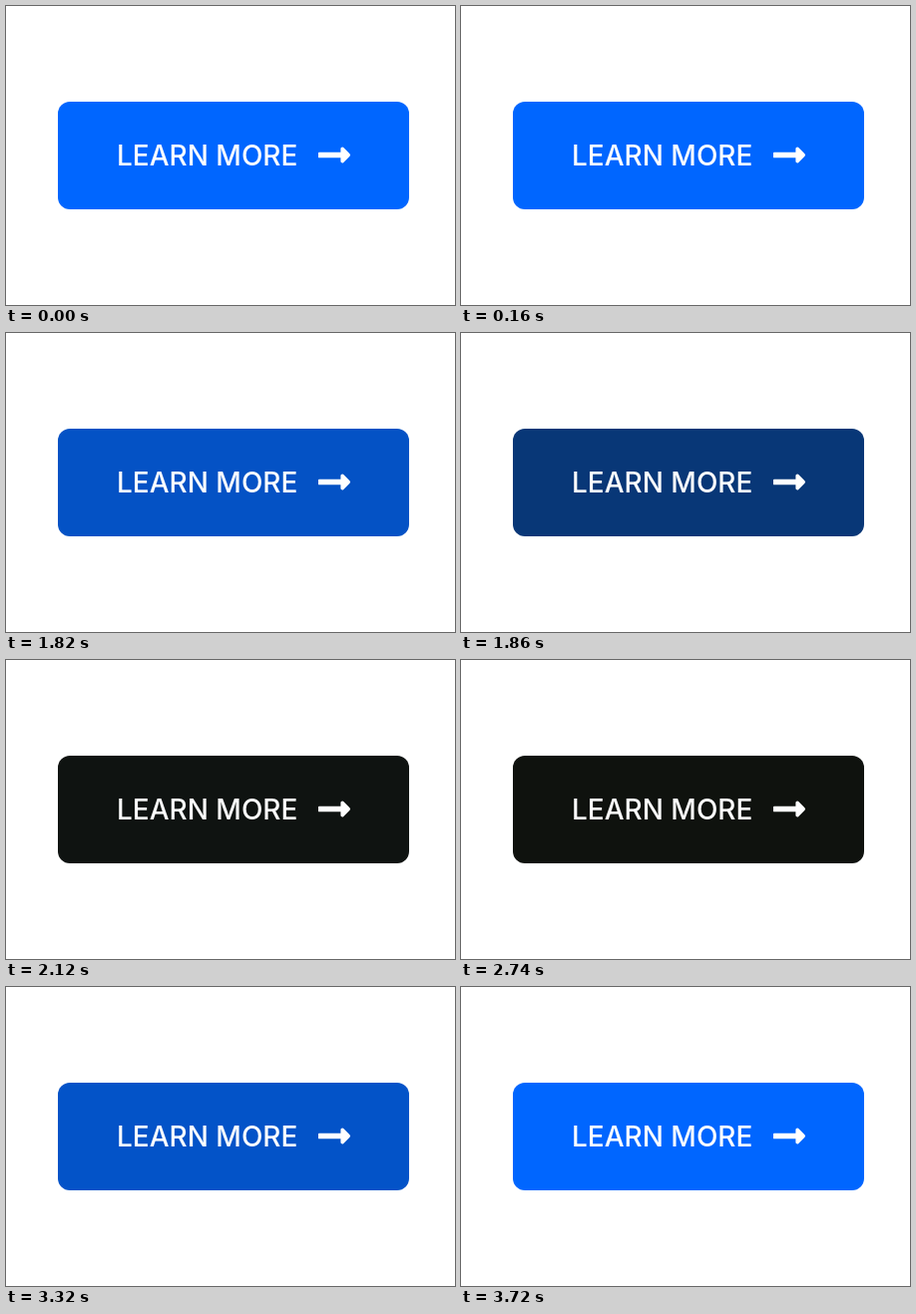
These frames come from a looping animation (450 px wide and 300 px high, 4.44 s). An HTML page with a canvas:

```html
<!DOCTYPE html>
<html lang="en">
<head>
<meta charset="utf-8">
<title>Learn more button</title>
<style>
  html, body { margin: 0; width: 100%; height: 100%; overflow: hidden; background: #fff; }
  canvas { display: block; width: 450px; height: 300px; }
</style>
</head>
<body>
<canvas id="stage" width="450" height="300"></canvas>
<script>
const ctx = document.getElementById('stage').getContext('2d');
const LOOP = 4440, FADE = 500, DARKEN_AT = 1801, LIGHTEN_AT = 3214;
const BLUE = [0, 102, 255], BLACK = [15, 18, 14];

const easeOutExpo = t => t <= 0 ? 0 : t >= 1 ? 1 : 1 - 2 ** (-10 * t);

function darkness(ms) {
  return easeOutExpo((ms - DARKEN_AT) / FADE) * (1 - easeOutExpo((ms - LIGHTEN_AT) / FADE));
}

const mix = (a, b, k) => `rgb(${a.map((v, i) => Math.round(v + (b[i] - v) * k)).join(',')})`;

// Arrow outline relative to the middle of its left end: x, y, corner radius
const ARROW = [
  [0, -2.86, 0.86], [22.42, -2.86, 0], [22.42, -10.3, 1.7], [32.7, 0, 1.7],
  [22.42, 10.3, 1.7], [22.42, 2.86, 0], [0, 2.86, 0.86]
];

function drawArrow(x, y) {
  ctx.beginPath();
  ctx.moveTo(x, y);
  ARROW.forEach(([px, py, r], i) => {
    const [nx, ny] = ARROW[i + 1] || [0, 0];
    ctx.arcTo(x + px, y + py, x + nx, y + ny, r);
  });
  ctx.closePath();
  ctx.fill();
}

function draw(ms) {
  ctx.fillStyle = '#fff';
  ctx.fillRect(0, 0, 450, 300);

  ctx.fillStyle = mix(BLUE, BLACK, darkness(ms));
  ctx.beginPath();
  ctx.roundRect(52, 96, 352, 108, 12);
  ctx.fill();

  ctx.fillStyle = '#fff';
  ctx.font = '500 28px Inter, sans-serif';
  ctx.fillText('LEARN MORE', 111, 160);
  drawArrow(313, 149.5);
}

const start = performance.now();
function tick() {
  draw((performance.now() - start) % LOOP);
  requestAnimationFrame(tick);
}
tick();
</script>
</body>
</html>
```
